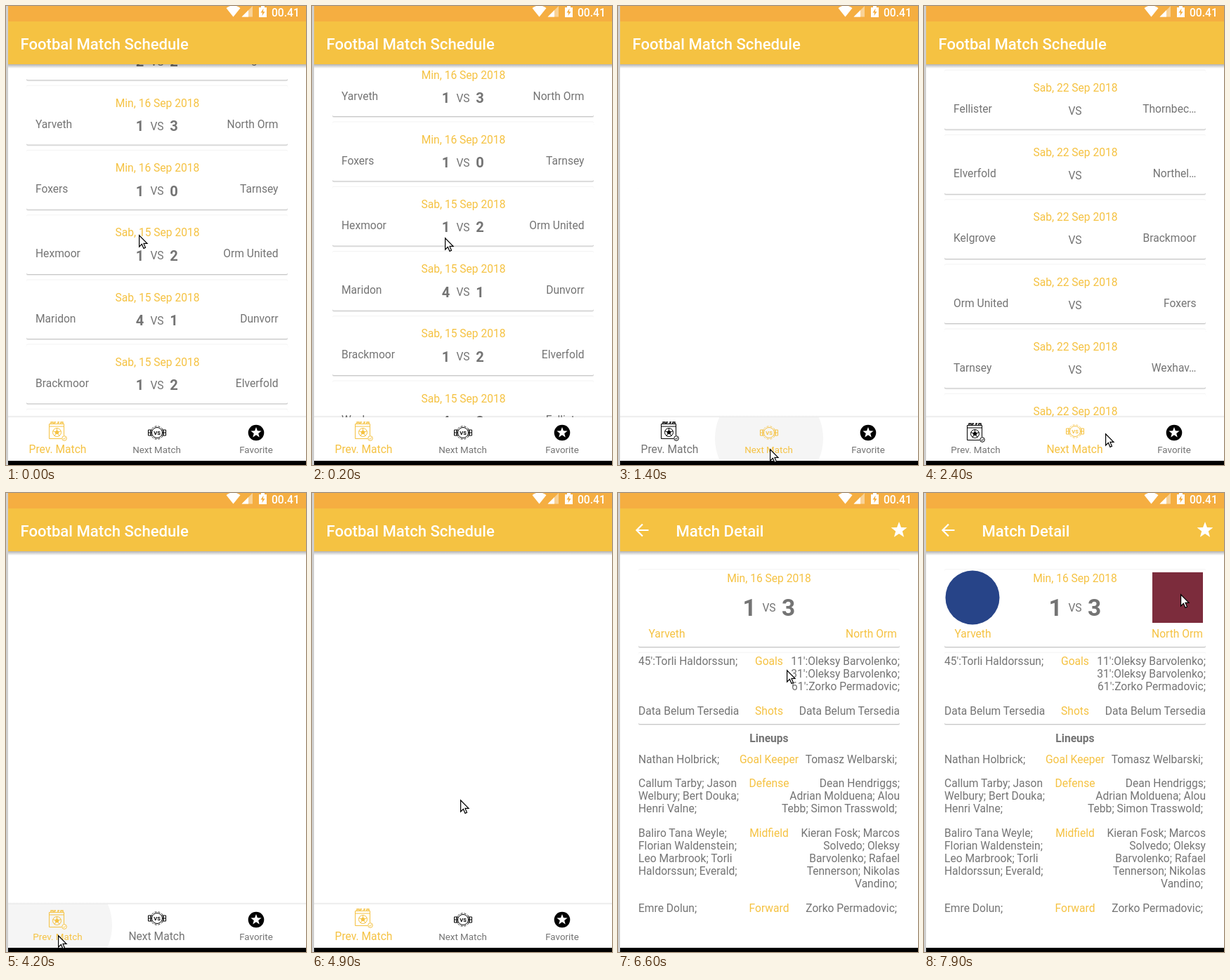
An HTML page for the animation above (8 s loop, 427 by 654 pixels).

```html
<!DOCTYPE html>
<html lang="en">
<head>
<meta charset="utf-8">
<title>Match schedule</title>
<style>
  html, body { margin: 0; width: 100%; height: 100%; overflow: hidden; background: #fff; }
  svg { display: block; width: 427px; height: 654px; }
  text { font: 15.6px Roboto, sans-serif; fill: #747474; white-space: pre; }
  .gold { fill: #f5c242; }
  .bold { font-weight: 700; }
  .score { font-size: 20.1px; font-weight: 700; }
  .big { font-size: 33.5px; font-weight: 700; }
  .title { font-size: 22.1px; font-weight: 500; fill: #fff; }
  .clock { font-weight: 500; fill: #fff; }
  .vs { font-size: 7.5px; font-weight: 700; fill: currentColor; }
</style>
</head>
<body>
<svg id="stage" viewBox="0 0 427 654"></svg>
<script>
const GOLD = '#f5c242', LOOP = 8000, STEP = 100;
const CARD_TOP = 91.5, PITCH = 92.2, MID = 215;

const text = (x, y, str, cls = '', anchor = 'start') =>
  `<text x="${x}" y="${y}" class="${cls}" text-anchor="${anchor}">${str}</text>`;
const rect = (x, y, w, h, fill, more = '') =>
  `<rect x="${x}" y="${y}" width="${w}" height="${h}" fill="${fill}" ${more}/>`;
const group = (id, body) => `<g id="${id}">${body}</g>`;

function radial(cx, cy, radii, count) {
  return Array.from({ length: count }, (_, i) => {
    const a = i * 2 * Math.PI / count - Math.PI / 2, r = radii[i % radii.length];
    return `${(cx + r * Math.cos(a)).toFixed(2)},${(cy + r * Math.sin(a)).toFixed(2)}`;
  });
}
const star = (cx, cy, r) =>
  `<polygon points="${radial(cx, cy, [r, r * .42], 10).join(' ')}" fill="#fff"/>`;

const card = (y, h) =>
  rect(29, y + 2, 372, h, '#ebebeb', 'rx="2"') +
  rect(29, y + 1, 372, h, '#c8c8c8', 'rx="2"') +
  rect(29, y - .7, 372, h, '#f3f3f3', 'rx="2"') +
  rect(29, y + .3, 372, h - .3, '#fff', 'rx="2"');

function matchList(rows) {
  return rows.map(([date, home, away, score], i) => {
    const y = CARD_TOP + i * PITCH;
    const [a, b] = score || ['', ''];
    return card(y, 84) +
      text(MID + .5, y + 30.5, date, 'gold', 'middle') +
      text(42, y + 60.5, home) +
      text(387.5, y + 60.5, away, '', 'end') +
      text(190.5, y + 65, a, 'score', 'middle') +
      text(MID, y + 63.5, 'VS', '', 'middle') +
      text(239, y + 65, b, 'score', 'middle');
  }).join('');
}

const SUN = 'Min, 16 Sep 2018', SAT = 'Sab, 15 Sep 2018', NEXT = 'Sab, 22 Sep 2018';
const played = [
  ['Sen, 17 Sep 2018', 'Northel…', 'Kelgrove', '22'],
  [SUN, 'Yarveth', 'North Orm', '13'],
  [SUN, 'Foxers', 'Tarnsey', '10'],
  [SAT, 'Hexmoor', 'Orm United', '12'],
  [SAT, 'Maridon', 'Dunvorr', '41'],
  [SAT, 'Brackmoor', 'Elverfold', '12'],
  [SAT, 'Wexhav…', 'Fellister', '42'],
];
const upcoming = [
  [NEXT, 'Fellister', 'Thornbec…'],
  [NEXT, 'Elverfold', 'Northel…'],
  [NEXT, 'Kelgrove', 'Brackmoor'],
  [NEXT, 'Orm United', 'Foxers'],
  [NEXT, 'Tarnsey', 'Wexhav…'],
  [NEXT, 'Hexmoor', 'Maridon'],
];

// baseline, label, left lines, right lines
const facts = [
  [245, 'Goals', ["45':Torli Haldorssun;"],
    ["11':Oleksy Barvolenko;", "31':Oleksy Barvolenko;", "61':Zorko Permadovic;"]],
  [315.5, 'Shots', ['Data Belum Tersedia'], ['Data Belum Tersedia']],
  [384.5, 'Goal Keeper', ['Nathan Holbrick;'], ['Tomasz Welbarski; ']],
  [418.5, 'Defense', ['Callum Tarby; Jason', 'Welbury; Bert Douka;', 'Henri Valne;'],
    ['Dean Hendriggs;', 'Adrian Molduena; Alou', 'Tebb; Simon Trasswold; ']],
  [489.5, 'Midfield', ['Baliro Tana Weyle;', 'Florian Waldenstein;', 'Leo Marbrook; Torli', 'Haldorssun; Everald;'],
    ['Kieran Fosk; Marcos', 'Solvedo; Oleksy', 'Barvolenko; Rafael', 'Tennerson; Nikolas', 'Vandino; ']],
  [596.5, 'Forward', ['Emre Dolun;'], ['Zorko Permadovic; ']],
];
const lines = (x, y, list, anchor) =>
  list.map((s, i) => text(x, y + i * 18.2, s, '', anchor)).join('');

const detail =
  card(109, 110) + card(227.5, 101.5) +
  text(MID, 127, SUN, 'gold', 'middle') +
  text(187, 175, '1', 'big', 'middle') +
  text(MID, 168.5, 'VS', '', 'middle') +
  text(242.5, 175, '3', 'big', 'middle') +
  text(69.5, 206, 'Yarveth', 'gold', 'middle') +
  text(360.5, 206, 'North Orm', 'gold', 'middle') +
  text(MID, 354.5, 'Lineups', 'bold', 'middle') +
  facts.map(([y, label, left, right]) =>
    text(MID, y, label, 'gold', 'middle') +
    lines(29, y, left, 'start') + lines(401, y, right, 'end')).join('') +
  group('badges', '<circle cx="69" cy="149" r="38.5" fill="#274488"/>' +
    rect(325, 113, 72, 72, '#7c2c3c'));

const header =
  rect(3, 83, 424, 6, 'url(#shade)') +
  rect(3, 0, 424, 22, '#f5ae41') + rect(3, 22, 424, 61, GOLD) +
  `<g fill="#fff">
    <path d="M313.5 3Q323.5 -4.5 333.5 3L323.5 15.5Z"/>
    <path d="M351 0V15.5H335.5Z" opacity=".45"/><path d="M345 6V15.5H335.5Z"/>
    <path d="M360 2H363V0H368V2H371V16H360Z"/>
    <path d="M366.5 3.5L362.5 9.5H365L364.5 14L368.5 8H366Z" fill="#f5ae41"/>
  </g>` +
  text(378, 14.5, '00.41', 'clock') +
  group('listTitle', text(20.5, 61.5, 'Footbal Match Schedule', 'title')) +
  group('detailTitle', text(82.5, 61.5, 'Match Detail', 'title') +
    '<path d="M43.5 53H27M35 44.5L26.5 53L35 61.5" fill="none" stroke="#fff" stroke-width="2.2"/>' +
    star(400, 53, 12));

const calendarIcon = `<g fill="none" stroke="currentColor">
  <path d="M82.5 614V597.5H61.5V618.5H79M61.5 601H82.5"/>
  <path d="M64 597V595H67V598M69 597V595H71M74 597V595H76M78 598V595H81V597" stroke-width="1.4"/>
  <circle cx="72.5" cy="609.5" r="6"/>
  <polygon points="${radial(72.5, 609.5, [2.6], 5).join(' ')}" fill="currentColor"/>
  <path d="${radial(72.5, 609.5, [6], 5).map(p => `M72.5 609.5L${p}`).join('')}"/>
  <circle cx="83" cy="618" r="3.3" fill="#fff"/><path d="M81.3 618L82.6 619.3L84.8 616.8"/>
</g>`;
const versusIcon = `<g fill="none" stroke="currentColor">
  <path d="M208 604H202.5V612H208M202.5 608H207M206 604V612M222 604H227.5V612H222M223 608H227.5M224 604V612"/>
  <circle cx="215" cy="608" r="7.5"/>
  <circle cx="215" cy="608" r="9.3" stroke-dasharray="3 2" stroke-width=".8"/></g>` +
  text(215, 610.7, 'VS', 'vs', 'middle');
const starIcon = '<circle cx="356" cy="608" r="11.3" fill="#000"/>' + star(356, 608, 8);

const tab = (name, x, icon, label) =>
  group(name + 'Icon', icon) +
  `<text id="${name}Label" x="${x}" y="637" text-anchor="middle" style="font-size:13.4px">${label}</text>`;

const nav =
  rect(3, 583, 424, 3, 'url(#lift)') + rect(3, 586, 424, 62, '#fff') +
  '<circle id="ripple" cy="616" r="77" fill="#f5f5f5" clip-path="url(#navClip)"/>' +
  tab('prev', 73.5, calendarIcon, 'Prev. Match') +
  tab('next', 214.5, versusIcon, 'Next Match') +
  tab('fav', 356, starIcon, 'Favorite');

const gradient = (id, from, to) =>
  `<linearGradient id="${id}" x2="0" y2="1"><stop stop-opacity="${from}"/><stop offset="1" stop-opacity="${to}"/></linearGradient>`;

document.getElementById('stage').innerHTML =
  `<defs>${gradient('shade', .3, 0)}${gradient('lift', 0, .1)}
   <clipPath id="navClip">${rect(3, 586, 424, 62, '#000')}</clipPath></defs>` +
  group('played', matchList(played)) + group('upcoming', matchList(upcoming)) +
  group('detail', detail) + header + group('nav', nav) +
  rect(3, 648, 424, 6, '#000') + rect(0, 0, 3, 654, '#cfcfcf') +
  '<path id="cursor" d="M.6 .8V17L4.4 13.4L7 19.4L9.5 18.3L7 12.4H12Z" fill="#fff" stroke="#000" stroke-width="1.2"/>';

const $ = id => document.getElementById(id);
const show = (id, on) => $(id).setAttribute('visibility', on ? 'inherit' : 'hidden');
const ramp = (t, from, to) => Math.min(1, Math.max(0, (t - from) / (to - from)));

// time, x, y of the pointer tip
const pointer = [
  [0, 189, 326], [200, 189, 330], [900, 216, 612], [1100, 216, 631], [2000, 216, 631],
  [2400, 258, 609], [3100, 258, 609], [3200, 288, 246], [3400, 288, 246], [3500, 78, 539],
  [3800, 78, 539], [3900, 74, 630], [4500, 74, 630], [4900, 211, 437], [5000, 220, 415],
  [5400, 241, 247], [5500, 241, 247], [5600, 241, 246], [6500, 241, 246], [6600, 240, 252],
  [7400, 301, 291], [7500, 301, 291], [7600, 320, 247], [7700, 320, 247], [7900, 365, 144],
  [LOOP, 365, 144],
];
function pointerAt(t) {
  const i = pointer.findIndex(k => k[0] > t);
  const [t0, x0, y0] = pointer[i - 1], [t1, x1, y1] = pointer[i];
  const p = ramp(t, t0, t1);
  return [x0 + (x1 - x0) * p, y0 + (y1 - y0) * p];
}

function setTab(name, active, level) {
  const icon = $(name + 'Icon'), label = $(name + 'Label');
  icon.style.color = active ? GOLD : '#000';
  icon.setAttribute('transform', `translate(0 ${-2 * level})`);
  label.style.fill = active ? GOLD : '#747474';
  label.style.fontSize = 13.4 + 2.2 * level + 'px';
}

const TO_NEXT = 1400, TO_PREV = 4200, TO_DETAIL = 6600;

function draw(t) {
  const onDetail = t >= TO_DETAIL, onNext = t >= TO_NEXT && t < TO_PREV;
  show('played', t < TO_NEXT || (t >= 5000 && !onDetail));
  show('upcoming', t >= 2000 && t < TO_PREV);
  show('detail', onDetail);
  show('badges', t >= 7000);
  show('detailTitle', onDetail);
  show('listTitle', !onDetail);
  show('nav', !onDetail);

  const scroll = t < TO_NEXT ? 70.2 + 40.4 * ramp(t, 0, 200) : 0;
  $('played').setAttribute('transform', `translate(0 ${-scroll})`);

  const nextLevel = ramp(t, TO_NEXT, TO_NEXT + 200) - ramp(t, TO_PREV, TO_PREV + 200);
  setTab('prev', !onNext, 1 - nextLevel);
  setTab('next', onNext, nextLevel);

  const tapped = t >= TO_PREV ? TO_PREV : TO_NEXT;
  $('ripple').setAttribute('cx', tapped === TO_PREV ? 74 : MID);
  $('ripple').setAttribute('opacity', t < TO_NEXT ? 0 : 1 - ramp(t, tapped, tapped + 400));

  $('cursor').setAttribute('transform', `translate(${pointerAt(t)})`);
}

const start = performance.now();
function tick() {
  const t = (performance.now() - start) % LOOP;
  draw(Math.floor(t / STEP) * STEP);
  requestAnimationFrame(tick);
}
tick();
</script>
</body>
</html>
```
